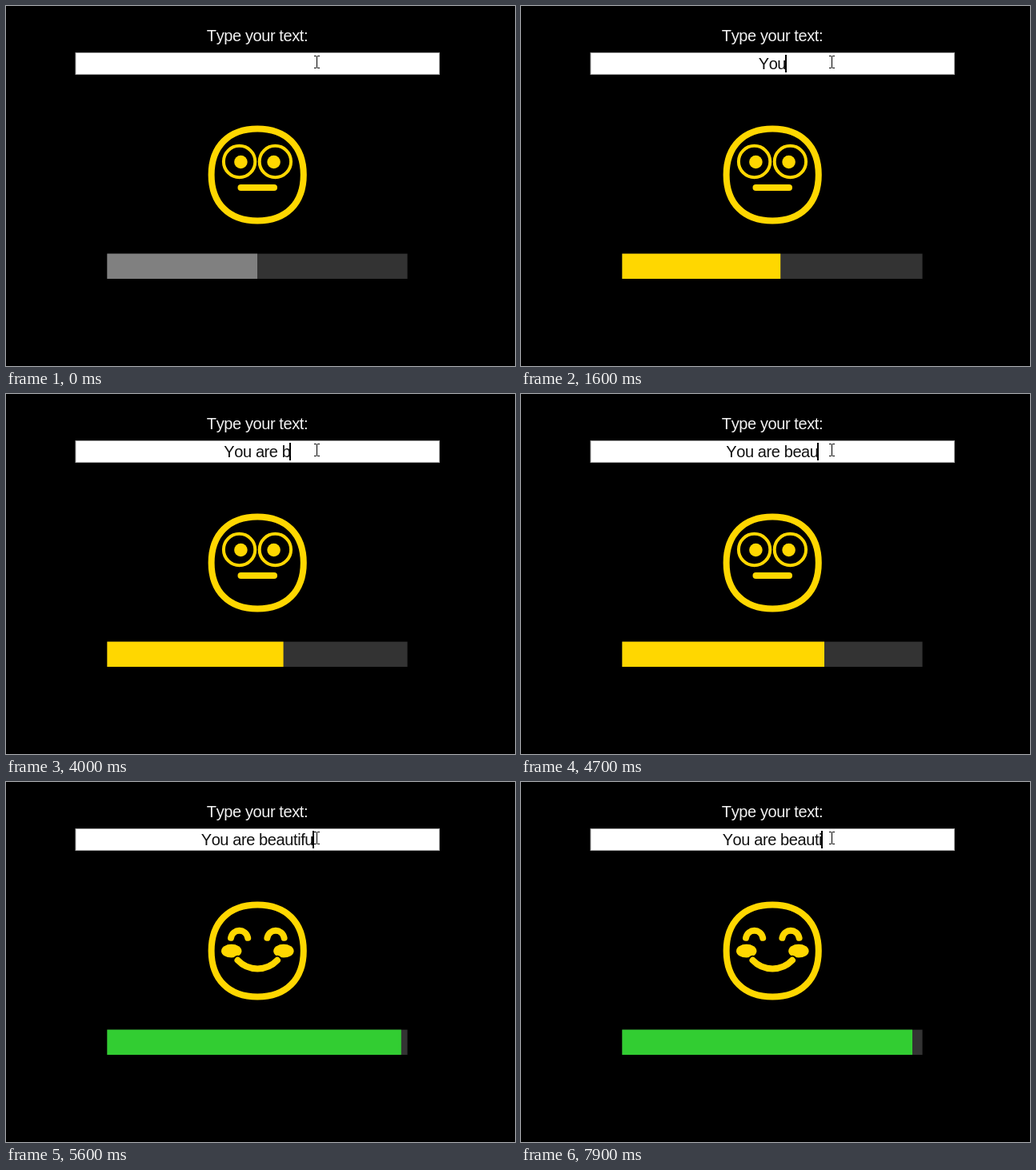
Write an HTML page with a canvas that moves like this. It is 636x450 px and loops after 8 s.

```html
<!DOCTYPE html>
<html lang="en">
<head>
<meta charset="utf-8">
<title>Mood meter</title>
<style>
html, body { margin: 0; width: 100%; height: 100%; overflow: hidden; background: #000; }
canvas { display: block; }
</style>
</head>
<body>
<canvas id="stage" width="636" height="450"></canvas>
<script>
const ctx = document.getElementById('stage').getContext('2d');
const LOOP = 8000, BLINK = 500, MID = 314;
const GOLD = '#ffd700', GREEN = '#32cd32', GREY = '#808080', TRACK = '#333';
const PHRASE = 'You are beautiful';

// Each burst of key presses adds (or removes) one letter per gap.
const BURSTS = [
  { at: -900, gap: BLINK, from: 0, add: 0 },
  { at: 1100, gap: 240, from: 0, add: 3 },
  { at: 1800, gap: 100, from: 3, add: 5 },
  { at: 3900, gap: 240, from: 8, add: 9 },
  { at: 7600, gap: 150, from: 17, add: -3 }
];

function typing(t) {
  const { at, gap, from, add } = BURSTS.filter(b => b.at <= t).pop();
  const presses = Math.min(Math.abs(add), Math.floor((t - at) / gap) + 1);
  return {
    count: from + Math.sign(add) * presses,
    since: at + Math.max(0, presses - 1) * gap
  };
}

// Bar length beyond the middle: steady, then surging until the mood is sure.
function mood(n) {
  if (n === 0) return 0;
  return n < 14 ? 3.4 * n + 128 * 2.3 ** (n - 14) : 175 + 2.4 * (n - 14);
}

function stroke(width, color, path) {
  ctx.lineWidth = width;
  ctx.strokeStyle = color;
  ctx.beginPath();
  path();
  ctx.stroke();
}

function oval(x, y, rx, ry) {
  ctx.fillStyle = GOLD;
  ctx.beginPath();
  ctx.ellipse(x, y, rx, ry, 0, 0, Math.PI * 2);
  ctx.fill();
}

function outline() {
  const x = 314.2, y = 211, r = 57.6, k = r * 0.62;
  stroke(8, GOLD, () => {
    ctx.moveTo(x, y - r);
    ctx.bezierCurveTo(x + k, y - r, x + r, y - k, x + r, y);
    ctx.bezierCurveTo(x + r, y + k, x + k, y + r, x, y + r);
    ctx.bezierCurveTo(x - k, y + r, x - r, y + k, x - r, y);
    ctx.bezierCurveTo(x - r, y - k, x - k, y - r, x, y - r);
    ctx.closePath();
  });
}

function neutral() {
  for (const side of [-1, 1]) {
    stroke(4, GOLD, () => ctx.arc(MID + side * 22.4, 194.5, 19.7, 0, Math.PI * 2));
    oval(MID + side * 20.6, 195, 8.3, 8.3);
  }
  stroke(8, GOLD, () => {
    ctx.moveTo(293.5, 227);
    ctx.lineTo(335, 227);
  });
}

function happy() {
  for (const side of [-1, 1]) {
    const eye = MID + 0.3 + side * 22.7;
    stroke(8, GOLD, () => {
      ctx.moveTo(eye - 10.6, 194.8);
      ctx.bezierCurveTo(eye - 8, 182.8, eye + 8, 182.8, eye + 10.6, 194.8);
    });
    oval(MID + 0.3 + side * 32.6, 211.2, 12.7, 8.4);
  }
  const smile = () => {
    ctx.moveTo(289.5, 222.8);
    ctx.bezierCurveTo(303, 237, 325.5, 237, 339, 222.8);
  };
  stroke(12, '#000', smile);
  stroke(8, GOLD, smile);
}

function pointer() {
  ctx.fillStyle = '#000';
  ctx.fillRect(388, 63, 1, 14);
  for (const y of [62, 77]) {
    ctx.fillRect(385, y, 3, 1);
    ctx.fillRect(389, y, 3, 1);
  }
}

function centred(text, x, y, color) {
  const width = ctx.measureText(text).width;
  ctx.fillStyle = color;
  ctx.fillText(text, x - width / 2, y);
  return x + width / 2;
}

function field(text, caret) {
  ctx.fillStyle = '#a5a5a5';
  ctx.fillRect(86.5, 58, 455.5, 28);
  ctx.fillStyle = '#fff';
  ctx.fillRect(87.5, 59, 453.5, 26);
  const end = centred(text, 313.9, 79, '#111');
  if (caret) {
    ctx.fillStyle = '#000';
    ctx.fillRect(Math.floor(end) - 1, 61, 2, 22);
  }
  pointer();
}

function bar(amount, color) {
  ctx.fillStyle = TRACK;
  ctx.fillRect(126.4, 309.6, 375.2, 31.4);
  ctx.fillStyle = color;
  ctx.fillRect(126.4, 309.6, MID - 126.4 + amount, 31.4);
}

function draw(t) {
  const { count, since } = typing(t);
  const glad = count > 12;
  const caret = Math.floor((t - since) / BLINK) % 2 === 0;

  ctx.fillStyle = '#000';
  ctx.fillRect(0, 0, 636, 450);
  ctx.lineCap = 'round';
  ctx.font = '20px "Liberation Sans", Arial, sans-serif';
  ctx.fontKerning = 'none';
  ctx.letterSpacing = '-0.4px';

  centred('Type your text:', MID, 44, '#f2f2f2');
  field(PHRASE.slice(0, count), caret);
  outline();
  if (glad) happy(); else neutral();
  bar(mood(count), glad ? GREEN : count ? GOLD : GREY);
}

const start = performance.now();
function tick() {
  draw((performance.now() - start) % LOOP);
  requestAnimationFrame(tick);
}
tick();
</script>
</body>
</html>
```
